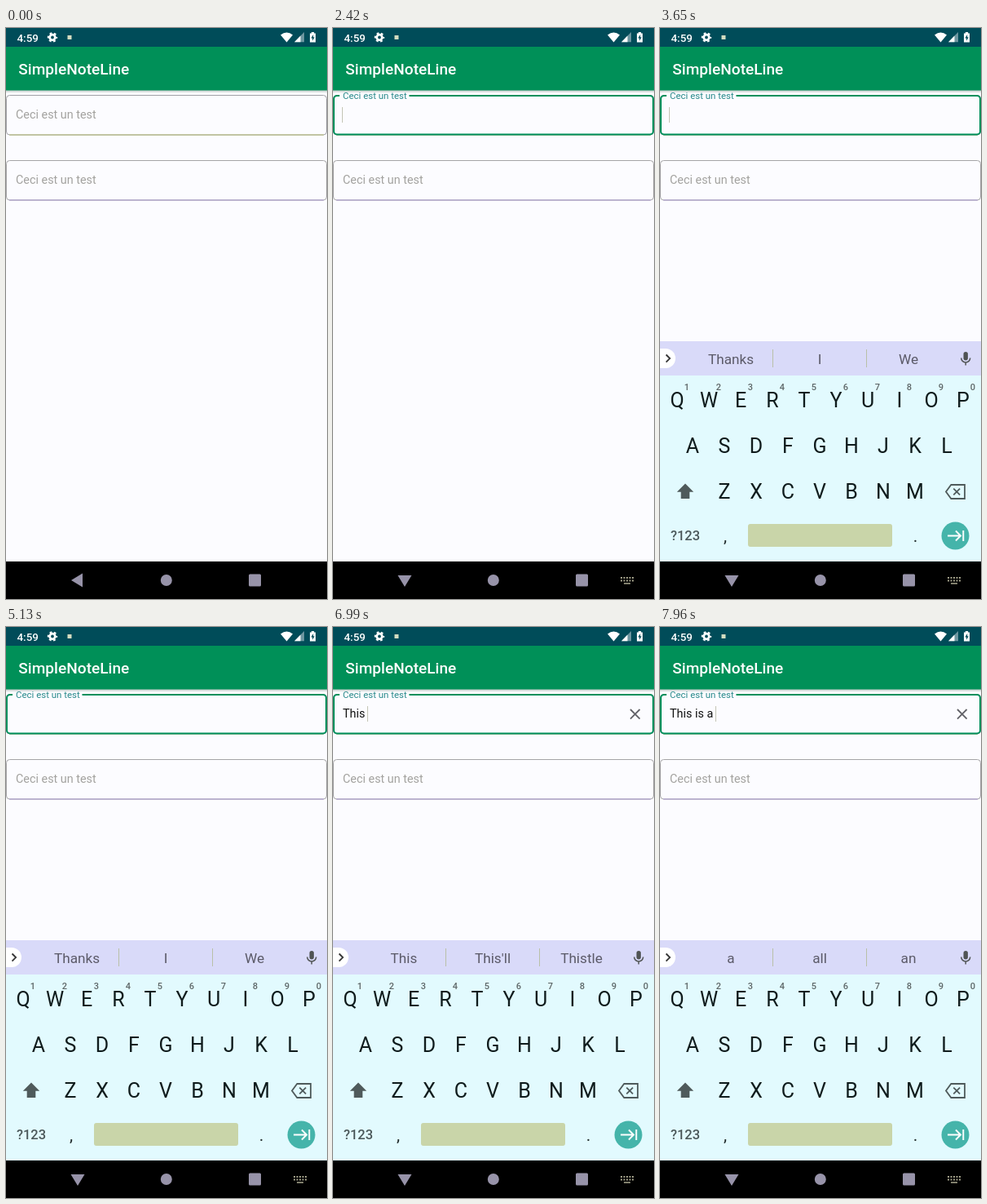
An HTML page that plays this animation: 394 by 700 pixels, repeating every 8 s.

```html
<!DOCTYPE html>
<html lang="en">
<head>
<meta charset="utf-8">
<title>Text field demo</title>
<style>
  html, body { margin: 0; width: 100%; height: 100%; overflow: hidden; background: #fcfcff; }
  svg { position: absolute; left: 0; top: 0; display: block; }
  text { font-family: Roboto, sans-serif; }
  .mid { text-anchor: middle; }
  .hint { font-size: 14.36px; fill: #a3a29f; }
  .nav { fill: #9793a9; }

  /* All timelines share one 8 s loop: 1% = 80 ms */
  .focus, .gap, .label, .back, .ime, .board, .blink {
    animation-duration: 8s; animation-iteration-count: infinite;
  }
  .focus { animation-name: focus; animation-timing-function: linear; }
  .gap { animation-name: gap; transform-origin: 50.5px 83px; }
  .label { animation-name: label; }
  .back { animation-name: back; }
  .ime { animation-name: ime; animation-timing-function: step-end; }
  .board { animation-name: board; animation-timing-function: step-end; }
  .blink { animation-name: blink; animation-timing-function: step-end; }

  @keyframes focus { 0%, 25.75% { opacity: 0; } 27.5%, 100% { opacity: 1; } }
  @keyframes gap { 0%, 25.75% { transform: scaleX(0); } 28%, 100% { transform: scaleX(1); } }
  @keyframes label {
    0%, 25.75% { transform: translate(12px, 111px); fill: #a3a29f;
      animation-timing-function: cubic-bezier(.4, 0, .2, 1); }
    28.25%, 100% { transform: translate(12px, 87px) scale(.8); fill: #2a8a8c; }
  }
  @keyframes back {
    0%, 28% { transform: translate(88px, 677px); }
    30.2%, 100% { transform: translate(88px, 677px) rotate(-90deg); }
  }
  @keyframes ime { 0% { opacity: 0; } 30%, 100% { opacity: 1; } }
  @keyframes board { 0% { visibility: hidden; } 33%, 100% { visibility: visible; } }
  @keyframes blink {
    0% { opacity: 0; } 28.25% { opacity: 1; }
    39% { opacity: 0; } 45.625% { opacity: 1; }
    51.75% { opacity: 0; } 58% { opacity: 1; }
    64.125% { opacity: 0; } 70.75% { opacity: 1; }
    76.875% { opacity: 0; } 78%, 100% { opacity: 1; }
  }

  .entry {
    position: absolute; left: 12px; top: 97px; height: 19px;
    font: 14.36px/19px Roboto, sans-serif; color: #111; white-space: pre;
  }
  .entry i {
    display: inline-block; width: 1px; height: 19px; margin-left: -1px;
    vertical-align: top; background: #c3c4b6;
  }
  .low .shift { fill: none; stroke: #4f5a5b; stroke-width: 1.8; }
</style>
</head>
<body>
<svg width="394" height="700" viewBox="0 0 394 700">
  <defs>
    <linearGradient id="shade" x2="0" y2="1">
      <stop stop-color="#b9c4c0"/><stop offset="1" stop-color="#fcfcff"/>
    </linearGradient>
  </defs>
  <rect width="394" height="700" fill="#fcfcff"/>

  <!-- app bar and status bar -->
  <rect y="76" width="394" height="4" fill="url(#shade)"/>
  <rect y="23" width="394" height="53.5" fill="#009058"/>
  <rect width="394" height="23" fill="#004c59"/>
  <text x="15.3" y="57" font-size="19.1" font-weight="500" fill="#fff">SimpleNoteLine</text>
  <text x="13.5" y="16.5" font-size="13.4" font-weight="500" fill="#fff">4:59</text>
  <g fill="none" stroke="#fff">
    <circle cx="57" cy="11.5" r="3.3" stroke-width="2.8"/>
    <circle cx="57" cy="11.5" r="5.2" stroke-width="2" stroke-dasharray="2.7 2.745" stroke-dashoffset="1.35"/>
  </g>
  <rect x="75.5" y="9" width="5" height="5" fill="#d3dcc0"/>
  <path d="M337 8.6Q344.5 2.4 352 8.6L344.5 17.4z" fill="#fff"/>
  <path d="M354 17.2H366V5z" fill="#6d96a0"/>
  <path d="M354 17.2H361.5V9.6z" fill="#fff"/>
  <path d="M373 6.5h1.9V5h3.2v1.5H380V17.4H373z" fill="#fff"/>
  <path d="M377.2 8l-2.8 4.4h1.7v3.4l2.6-4.6h-1.6z" fill="#004c59"/>

  <!-- first field -->
  <rect x=".5" y="82.5" width="393" height="48.5" rx="4" fill="none" stroke="#a0a0a6"/>
  <path d="M4 131H390" stroke="#b4bb74"/>
  <rect class="focus" x="1" y="83" width="392" height="47.5" rx="4" fill="none" stroke="#00905c" stroke-width="2"/>
  <rect class="gap" x="8" y="81" width="85.5" height="4" fill="#fcfcff"/>
  <text class="hint label">Ceci est un test</text>
  <path id="clear" d="M365 101l11.6 11.6M376.6 101L365 112.6" stroke="#626268" stroke-width="1.8" opacity="0"/>

  <!-- second field -->
  <rect x=".5" y="162.5" width="393" height="48.5" rx="4" fill="none" stroke="#a5a4a6"/>
  <path d="M4 211H390" stroke="#a796cc"/>
  <text class="hint" x="12" y="191">Ceci est un test</text>

  <!-- keyboard -->
  <g class="board">
    <g id="board">
      <rect y="384" width="394" height="42" fill="#d9daf9"/>
      <rect y="426" width="394" height="228" fill="#e2fafe"/>
      <path d="M0 393H7a12 12 0 0 1 0 24H0z" fill="#fff"/>
      <path d="M7.5 400.5l4.6 4.6-4.6 4.6" fill="none" stroke="#333" stroke-width="1.8"/>
      <path d="M138.5 394v22M253.5 394v22" stroke="#b9c0a8"/>
      <g id="words" class="mid" font-size="17.2" fill="#5b5a68"></g>
      <rect x="372.5" y="397" width="5.4" height="10.5" rx="2.7" fill="#505454"/>
      <path d="M369.7 404.5a5.5 5.5 0 0 0 11 0M375.2 410v3.6" fill="none" stroke="#505454" stroke-width="1.5"/>
      <g id="keys" class="mid" font-size="25" fill="#0f1b1c"></g>
      <g id="digits" class="mid" font-size="11" font-weight="500" fill="#5d6667"></g>
      <path class="shift" d="M31 558.5L41.2 568.8H36.3V577H25.7V568.8H20.8z" fill="#4f5a5b"/>
      <g fill="none" stroke="#4f5a5b" stroke-width="1.8">
        <path d="M357.3 560H374V577H357.3L351 568.5z"/>
        <path d="M360.3 564.6l7.8 7.8M368.1 564.6l-7.8 7.8"/>
      </g>
      <text class="mid" x="31" y="628" font-size="16.5" font-weight="500" fill="#4c595b">?123</text>
      <text class="mid" x="80" y="630" font-size="21" fill="#222c2d">,</text>
      <text class="mid" x="313.5" y="630" font-size="21" fill="#222c2d">.</text>
      <rect x="108" y="608" width="177" height="28" rx="3" fill="#c9d5a9"/>
      <circle cx="362.5" cy="622.5" r="17" fill="#45b4aa"/>
      <path d="M353 622.5H368.5M363 616.5l6 6-6 6M372.3 616v13" fill="none" stroke="#fff" stroke-width="1.9"/>
    </g>
  </g>

  <!-- navigation bar -->
  <rect y="654" width="394" height="46"/>
  <path class="nav back" d="M-8 0L6-8.5V8.5z"/>
  <circle class="nav" cx="196.8" cy="677" r="7"/>
  <rect class="nav" x="298" y="669.5" width="15" height="15" rx="1.5"/>
  <g class="ime" fill="none" stroke="#a3a18a" stroke-width="2">
    <path d="M353 674H369M353 677.6H369" stroke-dasharray="2 1.5"/>
    <path d="M357 681H365" stroke-width="1.6"/>
  </g>
</svg>
<div class="entry"><span id="typed"></span><i class="blink"></i></div>

<script>
const LOOP = 8000, CLEAR_AT = 6240;
const $ = id => document.getElementById(id);

// [time, value] steps; each value holds until the next one
const typing = [
  [0, ''], [6240, 'T'], [6400, 'Th'], [6590, 'Thi'], [6660, 'This'], [6990, 'This '],
  [7210, 'This is'], [7300, 'This is '], [7830, 'This is a'], [7960, 'This is a ']
];
const hints = [
  [0, 'Thanks I We'], [6320, 'T The To'], [6450, 'Th The This'], [6630, 'Thi This Thing'],
  [6720, "This This'll Thistle"], [7030, 'is was will'], [7250, "is isn't issue"],
  [7340, 'a the not'], [7870, 'a all an']
];
// Letters show as capitals at the start of every word
const caps = [[0, true], [6280, false], [6990, true], [7210, false], [7300, true], [7830, false], [7960, true]];

const at = (steps, t) => steps.filter(s => s[0] <= t).pop()[1];

function addText(parent, x, y, str) {
  const el = document.createElementNS('http://www.w3.org/2000/svg', 'text');
  el.setAttribute('x', x);
  el.setAttribute('y', y);
  el.textContent = str;
  $(parent).append(el);
  return el;
}

const keys = [];
[['QWERTYUIOP', 21, 465], ['ASDFGHJKL', 40, 521], ['ZXCVBNM', 79, 577]].forEach(([row, x, y]) =>
  [...row].forEach((ch, i) => keys.push([addText('keys', x + i * 39, y, ch), ch])));
for (let i = 0; i < 10; i++) addText('digits', 33 + i * 39, 443.5, (i + 1) % 10);
const words = [87, 196, 305].map(x => addText('words', x, 411.5, ''));

let lastUpper = true, start;

function setCase(upper) {
  if (upper === lastUpper) return;
  lastUpper = upper;
  $('board').classList.toggle('low', !upper);
  keys.forEach(([el, ch]) => el.textContent = upper ? ch : ch.toLowerCase());
}

function draw(now) {
  start ??= now;
  const t = (now - start) % LOOP;
  $('typed').textContent = at(typing, t);
  at(hints, t).split(' ').forEach((w, i) => words[i].textContent = w);
  setCase(at(caps, t));
  $('clear').setAttribute('opacity', Math.min(1, Math.max(0, (t - CLEAR_AT) / 150)));
  requestAnimationFrame(draw);
}
requestAnimationFrame(draw);
</script>
</body>
</html>
```
